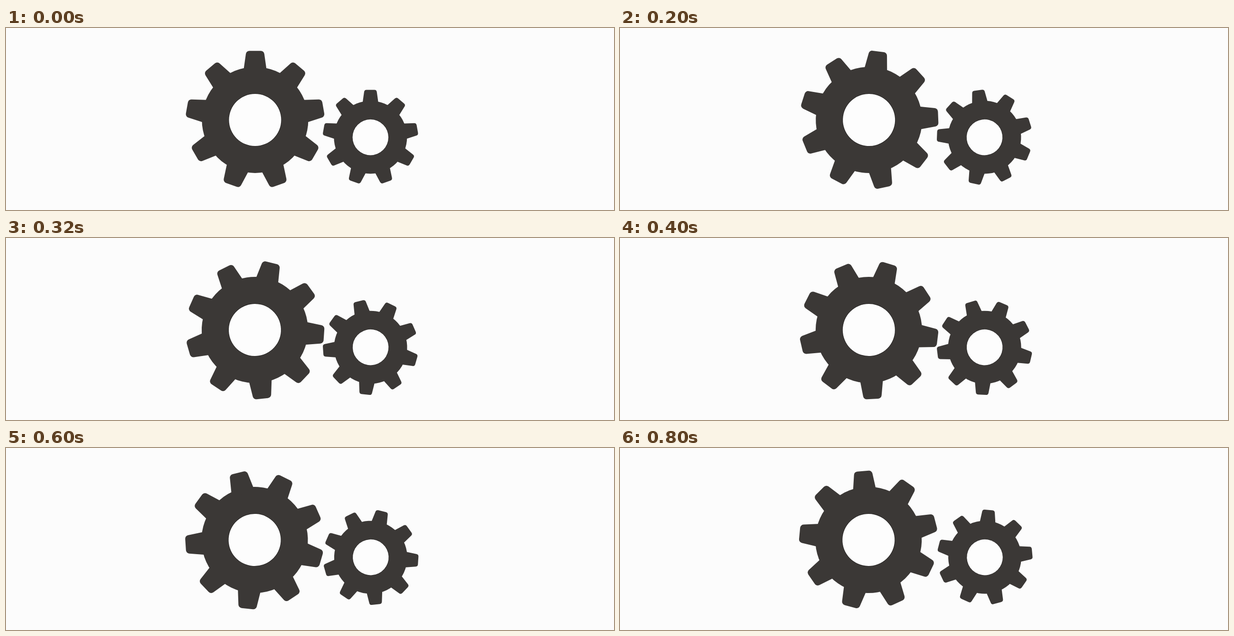
Recreate the animation shown at these times as an HTML page with a canvas. Size 1280 by 384 pixels, loop 840 ms.

```html
<!DOCTYPE html>
<html lang="en">
<head>
<meta charset="utf-8">
<title>Gears</title>
<style>
  html, body { margin: 0; width: 100%; height: 100%; overflow: hidden; background: #fcfcfc; }
  canvas { display: block; }
</style>
</head>
<body>
<canvas id="stage" width="1280" height="384"></canvas>
<script>
const ctx = document.getElementById('stage').getContext('2d');
const TEETH = 9, PITCH = 2 * Math.PI / TEETH;
const TICK = 40, TICKS = 21, STEPS = 26;

function tooth() {
  ctx.beginPath();
  ctx.moveTo(-25, -100);
  ctx.arcTo(-18.5, -145.8, 0, -145.8, 7.5);
  ctx.arcTo(18.5, -145.8, 25, -100, 7.5);
  ctx.lineTo(25, -100);
  ctx.fill();
}

function disc(radius) {
  ctx.beginPath();
  ctx.arc(0, 0, radius, 0, 2 * Math.PI);
  ctx.fill();
}

function gear(x, y, scale, angle) {
  ctx.save();
  ctx.translate(x, y);
  ctx.scale(scale, scale);
  ctx.rotate(angle);
  ctx.fillStyle = '#3b3836';
  disc(112);
  for (let i = 0; i < TEETH; i++) {
    tooth();
    ctx.rotate(PITCH);
  }
  // thin dark rim around the hole
  ctx.fillStyle = '#1f1d1c';
  disc(55.8);
  ctx.fillStyle = '#fdfdfd';
  disc(55);
  ctx.restore();
}

function draw() {
  const tick = Math.floor(performance.now() / TICK) % TICKS;
  // every sixth tick advances two steps
  const turn = Math.floor(tick * 7 / 6) / STEPS;
  ctx.fillStyle = '#fcfcfc';
  ctx.fillRect(0, 0, 1280, 384);
  gear(524.4 - 1.3 * turn, 194, 1, turn * PITCH);
  gear(767.3 + 0.8 * turn, 230.6, 0.687, -turn * PITCH);
  requestAnimationFrame(draw);
}
draw();
</script>
</body>
</html>
```
